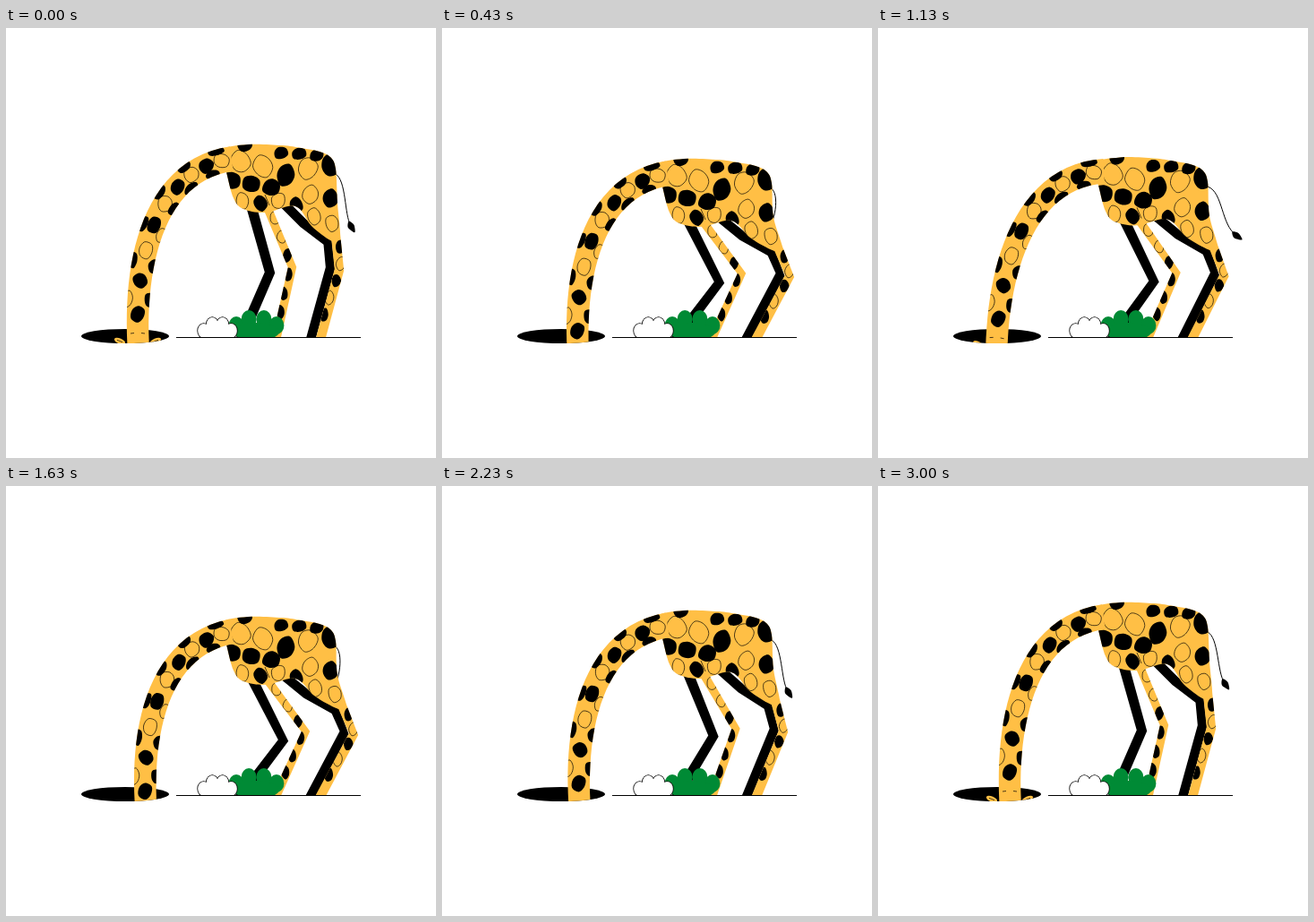
An HTML page with a canvas for the animation above (3.03 s loop, 480 px wide and 480 px high).

```html
<!DOCTYPE html>
<html lang="en">
<head>
<meta charset="utf-8">
<title>Giraffe</title>
<style>
html, body { margin: 0; width: 100%; height: 100%; overflow: hidden; background: #fff; }
canvas { display: block; width: 480px; height: 480px; }
</style>
</head>
<body>
<canvas id="stage" width="480" height="480"></canvas>
<script>
const ctx = document.getElementById('stage').getContext('2d');
const LOOP = 3030, DIP = 16, HIP = 205, FLOOR = 345;
const YELLOW = '#ffbf45', GREEN = '#008a35', BLACK = '#000';

// Motion keys: [time, value], eased between neighbours
const DIP_KEYS = [[0, 0], [400, 1], [770, 1], [1160, .9], [1630, 1], [1970, 1], [2540, 0], [LOOP, 0]];
const NECK_KEYS = [[0, 0], [200, .045], [430, -.024], [770, -.033], [1170, .08], [1630, -.048], [2200, -.033], [2600, 0], [LOOP, 0]];
const TAIL_KEYS = [[-380, 1], [430, -1], [1030, 1], [1715, -1], [2650, 1], [3460, -1]];

// Upright pose: body outline, and the middle line of each leg from hip to below the floor
const BODY = [[240, 137], [270, 130], [308, 131], [330, 134], [350, 138], [362, 144], [368, 157], [370, 195],
  [373, 238], [362, 237], [341, 221], [323, 199], [290, 206], [265, 202], [254, 190], [246, 161]];
const LEGS = {
  hind: { line: [[367, 222], [372, 270], [349, 355]], width: 10.5, knee: 270, dx: 16, dy: 7 },
  hindFar: { line: [[308, 194], [332, 218], [359, 239], [362, 268], [338, 355]], width: 10.5, knee: 270, dx: 16, dy: 7 },
  front: { line: [[292, 201], [319.5, 267], [300, 355]], width: 9.5, knee: 267, dx: 15, dy: 7 },
  frontFar: { line: [[273, 196], [294.5, 273], [259, 355]], width: 11.5, knee: 273, dx: 15, dy: 11 },
};

const mix = (a, b, u) => a + (b - a) * u;

function valueAt(keys, t) {
  const i = keys.findIndex(k => k[0] > t);
  const [t0, a] = keys[i - 1], [t1, b] = keys[i];
  const u = (t - t0) / (t1 - t0);
  return mix(a, b, u * u * (3 - 2 * u));
}

// Above the hip a part sinks fully; the knee swings out; the foot stays put
const legWarp = ({ knee, dx, dy }, dip) => (x, y) => {
  if (y < HIP) return [x, y + DIP * dip];
  const above = (y - HIP) / (knee - HIP), below = (FLOOR - y) / (FLOOR - knee);
  return y < knee
    ? [x + dx * above * dip, y + mix(DIP, dy, above) * dip]
    : [x + dx * below * dip, y + dy * below * dip];
};

function neckAt(t) {
  const s = 1 - t;
  const bezier = (a, b, c, d) => s * s * s * a + 3 * s * s * t * b + 3 * s * t * t * c + t * t * t * d;
  return [bezier(147, 147, 175, 262), bezier(330, 240, 150, 145)];
}

// A point beside the neck's middle line, with the turn of the neck there
function besideNeck(t, offset) {
  const [x, y] = neckAt(t), [x2, y2] = neckAt(t + .01);
  const turn = Math.atan2(y2 - y, x2 - x) + Math.PI / 2;
  return [x + offset * Math.cos(turn), y + offset * Math.sin(turn), turn];
}

function besideLeg({ line }, y, offset) {
  const i = line.findIndex(p => p[1] > y);
  const [x0, y0] = line[i - 1], [x1, y1] = line[i];
  return [mix(x0, x1, (y - y0) / (y1 - y0)) + offset, y, 0];
}

function polygon(points, path = new Path2D()) {
  points.forEach((p, i) => path[i ? 'lineTo' : 'moveTo'](...p));
  path.closePath();
  return path;
}

function smooth(p) {
  const path = new Path2D(), n = p.length;
  path.moveTo(...p[0]);
  for (let i = 0; i < n; i++) {
    const a = p[(i + n - 1) % n], b = p[i], c = p[(i + 1) % n], d = p[(i + 2) % n];
    path.bezierCurveTo(b[0] + (c[0] - a[0]) / 6, b[1] + (c[1] - a[1]) / 6,
      c[0] - (d[0] - b[0]) / 6, c[1] - (d[1] - b[1]) / 6, ...c);
  }
  path.closePath();
  return path;
}

// A band of even width along a line
function ribbon(points, width, path) {
  const side = sign => points.map(([x, y], i) => {
    const [x0, y0] = points[Math.max(0, i - 1)], [x1, y1] = points[Math.min(points.length - 1, i + 1)];
    const k = sign * width / 2 / Math.hypot(x1 - x0, y1 - y0);
    return [x + (y1 - y0) * k, y - (x1 - x0) * k];
  });
  return polygon([...side(1), ...side(-1).reverse()], path);
}

const legPath = (leg, warp, path) => ribbon(leg.line.map(p => warp(...p)), leg.width, path);

function neckPath() {
  const left = [], right = [];
  for (let t = -.2; t <= 1; t += .04) {
    const half = mix(12.2, 14, Math.max(0, t));
    left.push(besideNeck(t, -half));
    right.unshift(besideNeck(t, half));
  }
  return polygon([...left, ...right].map(([x, y]) => [x, y]));
}

// One row of coat spots: D is dark, L an outline, a dot leaves a gap
function row(pattern, w, h, place) {
  return [...pattern].map((kind, i) => {
    const [x, y, turn = 0] = place(i);
    return { kind, x, y, w, h, turn };
  }).filter(s => s.kind !== '.');
}

const bodyRow = (pattern, w, h, x, y, dx, dy, bow) => row(pattern, w, h, i =>
  [x + dx * i, y + dy * i + bow * Math.sin(Math.PI * i / (pattern.length - 1)) ** 3]);

const legRow = (pattern, leg, y, gap) => row(pattern, 10, 15, i =>
  besideLeg(leg, y + gap * i, 3.5 * Math.cos(i * .8)));

const NECK_SPOTS = [
  ...row('DDLDLDLDL', 16, 18, i => besideNeck(.04 + .145 * i - .0045 * i * i, 0)),
  ...row('LDDDDD', 11, 18, i => besideNeck(.1 + .16 * i, -12)),
  ...row('DDLDDD', 11, 17, i => besideNeck(.1 + .15 * i, 12)),
];
const BODY_SPOTS = [
  ...bodyRow('D.DDD', 16, 14, 267, 131, 20, 2.8, 3),
  ...bodyRow('LLDLD', 21, 25, 262, 149, 25, 1, 13),
  ...bodyRow('DDD.LD', 19, 20, 252, 170, 22, 4, 0),
  ...bodyRow('LDLDLL', 15, 18, 264, 193, 20, 5, -12),
  ...legRow('DLDLD', LEGS.hind, 244, 19),
];
const FRONT_SPOTS = legRow('LLDDDD', LEGS.front, 212, 21);

function blob({ x, y, w, h, turn }, warp) {
  const [cx, cy] = warp(x, y), cos = Math.cos(turn), sin = Math.sin(turn);
  return smooth(Array.from({ length: 6 }, (_, i) => {
    const a = i * Math.PI / 3 + x, r = .5 + .05 * Math.sin(i * 2.4 + x + y);
    const px = Math.cos(a) * w * r, py = Math.sin(a) * h * r;
    return [cx + px * cos - py * sin, cy + px * sin + py * cos];
  }));
}

function fill(path, color) {
  ctx.fillStyle = color;
  ctx.fill(path);
}

function spots(clip, list, warp) {
  ctx.save();
  ctx.clip(clip);
  ctx.lineWidth = .7;
  for (const s of list) {
    if (s.kind === 'D') fill(blob(s, warp), BLACK);
    else ctx.stroke(blob(s, warp));
  }
  ctx.restore();
}

function ellipse(x, y, rx, ry, turn = 0, path = new Path2D()) {
  path.ellipse(x, y, rx, ry, turn, 0, Math.PI * 2);
  return path;
}

function line(...points) {
  ctx.beginPath();
  points.forEach(p => ctx.lineTo(...p));
  ctx.stroke();
}

// Four puffs over a low mound
function bush(x, half, rx, ry, top, color, outlined) {
  const puffs = [-.83, -.31, .31, .83].map(k =>
    ellipse(x + k * half, top + ry + (Math.abs(k) > .5 ? 7 : 0), rx, ry));
  puffs.push(ellipse(x, FLOOR - 6, half * .95, 10));
  ctx.lineWidth = 1.6;
  if (outlined) puffs.forEach(p => ctx.stroke(p));
  puffs.forEach(p => fill(p, color));
}

function tail(swing, dip) {
  const out = Math.max(0, swing), back = Math.max(0, -swing);
  const tx = 15 + 17 * out - 20 * back, ty = 56 - 4 * out - 6 * back;
  const cx = 10 + 6 * out - 3 * back, cy = ty - 14;
  ctx.save();
  ctx.translate(367, 162 + DIP * dip);
  ctx.lineWidth = 1;
  ctx.beginPath();
  ctx.moveTo(-2, 0);
  ctx.bezierCurveTo(12 + 6 * out - 2 * back, 2, cx, cy, tx, ty);
  ctx.stroke();
  ctx.translate(tx, ty);
  ctx.rotate(Math.atan2(ty - cy, tx - cx) - Math.PI / 2);
  fill(smooth([[0, -2], [3.5, 3], [3, 8], [1, 12], [-2.5, 7], [-3.5, 3]]), BLACK);
  ctx.restore();
}

function head() {
  for (const side of [-1, 1]) {
    const x = 147 + 20 * side, turn = -.4 * side;
    fill(ellipse(x, 349.5, 6.5, 3, turn), YELLOW);
    line([x - 3, 349.5 - turn * 3], [x + 3, 349.5 + turn * 3]);
  }
}

// The neck turns rigidly about the shoulder and vanishes below the rim of the hole
function neck(turn, dip) {
  const opening = new Path2D();
  opening.rect(0, 0, 480, 344);
  opening.moveTo(182, 344);
  ctx.save();
  ctx.clip(ellipse(133, 344, 49, 8, 0, opening));
  ctx.translate(260, 150 + DIP * dip);
  ctx.rotate(turn);
  ctx.translate(-260, -150);
  ctx.lineWidth = .7;
  head();
  const path = neckPath();
  fill(path, YELLOW);
  spots(path, NECK_SPOTS, (x, y) => [x, y]);
  line([139, 341], [143, 340.5]);
  line([151, 340.5], [155, 341]);
  ctx.restore();
}

function draw(t) {
  const dip = valueAt(DIP_KEYS, t);
  const hindWarp = legWarp(LEGS.hind, dip), frontWarp = legWarp(LEGS.front, dip);
  ctx.fillStyle = '#fff';
  ctx.fillRect(0, 0, 480, 480);
  ctx.strokeStyle = BLACK;
  fill(ellipse(133, 344, 49, 8), BLACK);

  // Everything but the neck stands on the floor
  ctx.save();
  ctx.beginPath();
  ctx.rect(0, 0, 480, FLOOR + 1);
  ctx.clip();
  tail(valueAt(TAIL_KEYS, t), dip);
  for (const leg of [LEGS.frontFar, LEGS.hindFar]) fill(legPath(leg, legWarp(leg, dip)), BLACK);
  const front = legPath(LEGS.front, frontWarp);
  fill(front, YELLOW);
  spots(front, FRONT_SPOTS, frontWarp);
  const body = legPath(LEGS.hind, hindWarp, smooth(BODY.map(p => hindWarp(...p))));
  fill(body, YELLOW);
  spots(body, BODY_SPOTS, hindWarp);
  ctx.lineWidth = .7;
  line(hindWarp(289, 186), hindWarp(294, 198));
  bush(279.5, 27, 8.5, 10, 315, GREEN);
  bush(236, 18.5, 6.5, 8, 323, '#fff', true);
  ctx.restore();

  neck(valueAt(NECK_KEYS, t), dip);
  ctx.lineWidth = 1;
  line([190, 345.5], [396, 345.5]);
}

function frame() {
  draw(performance.now() % LOOP);
  requestAnimationFrame(frame);
}
frame();
</script>
</body>
</html>
```
